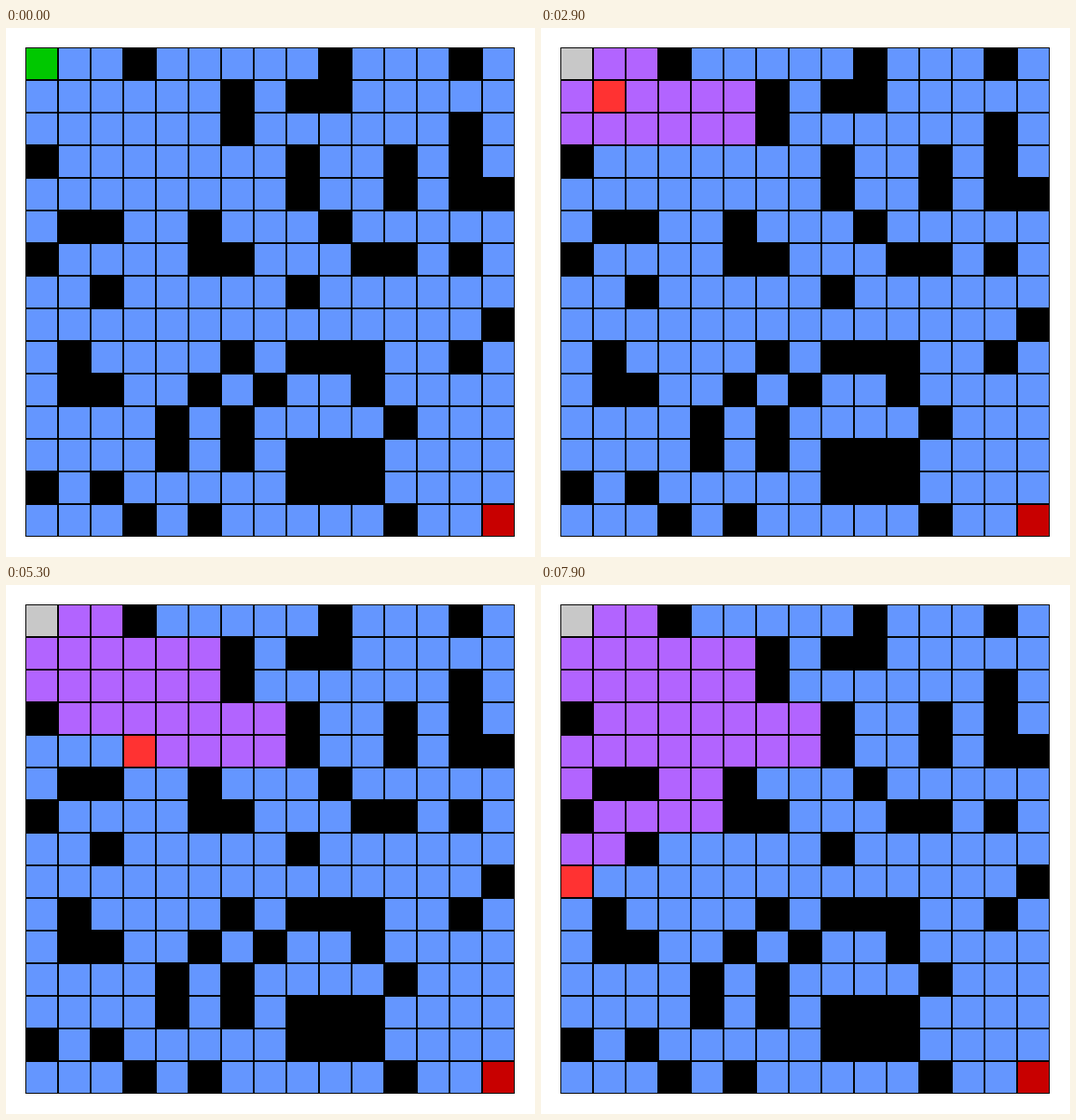
These frames come from a looping animation (600 px wide and 600 px high, 8000 ms). A matplotlib script:

```python
import matplotlib.pyplot as plt
from matplotlib.animation import FuncAnimation
from matplotlib.patches import Rectangle

SIZE, MARGIN, CELL = 600, 22, 37
FRAMES, INTERVAL = 80, 100

MAZE = [
    "...#.....#...#.",
    "......#.##.....",
    "......#......#.",
    "#.......#..#.#.",
    "........#..#.##",
    ".##..#...#.....",
    "#....##...##.#.",
    "..#.....#......",
    "..............#",
    ".#....#.###..#.",
    ".##..#.#..#....",
    "....#.#....#...",
    "....#.#.###....",
    "#.#.....###....",
    "...#.#.....#...",
]
N = len(MAZE)
START, GOAL = (0, 0), (N - 1, N - 1)


def rgb(r, g, b):
    return r / 255, g / 255, b / 255


FREE = rgb(100, 150, 255)
VISITED = rgb(178, 100, 255)
AGENT = rgb(0, 200, 0)
EXPANDED = rgb(255, 50, 50)
START_COLOR = rgb(200, 200, 200)
GOAL_COLOR = rgb(200, 0, 0)


def is_open(r, c):
    return 0 <= r < N and 0 <= c < N and MAZE[r][c] == "."


def depth_first(start, goal):
    """Cells in visiting order; right is tried first, then left, down, up."""
    stack, seen, order = [start], set(), []
    while stack:
        cell = stack.pop()
        if cell in seen:
            continue
        seen.add(cell)
        order.append(cell)
        if cell == goal:
            break
        r, c = cell
        for dr, dc in ((-1, 0), (1, 0), (0, -1), (0, 1)):
            if is_open(r + dr, c + dc):
                stack.append((r + dr, c + dc))
    return order


order = depth_first(START, GOAL)

fig = plt.figure(figsize=(SIZE / 100, SIZE / 100), dpi=100, facecolor="white")
ax = fig.add_axes([0, 0, 1, 1])
ax.set_xlim(0, SIZE)
ax.set_ylim(SIZE, 0)
ax.axis("off")


def add_square(x, y, side, color):
    patch = Rectangle((x, y), side, side, facecolor=color, linewidth=0,
                      antialiased=False)
    return ax.add_patch(patch)


add_square(MARGIN, MARGIN, N * CELL, "black")
tiles = {
    (r, c): add_square(MARGIN + c * CELL + 1, MARGIN + r * CELL + 1, CELL - 2, FREE)
    for r in range(N) for c in range(N) if is_open(r, c)
}


def base_color(cell):
    if cell == START:
        return START_COLOR
    return GOAL_COLOR if cell == GOAL else FREE


def update(frame):
    # Each cell takes two frames: the agent arrives, then expands it.
    step, expanding = divmod(frame, 2)
    colors = {cell: base_color(cell) for cell in tiles}
    for cell in order[:step]:
        if cell != START:
            colors[cell] = VISITED
    colors[order[step]] = EXPANDED if expanding else AGENT
    for cell, tile in tiles.items():
        tile.set_facecolor(colors[cell])
    return list(tiles.values())


anim = FuncAnimation(fig, update, frames=FRAMES, interval=INTERVAL,
                     repeat=True, repeat_delay=0, blit=False)
plt.show()
```
